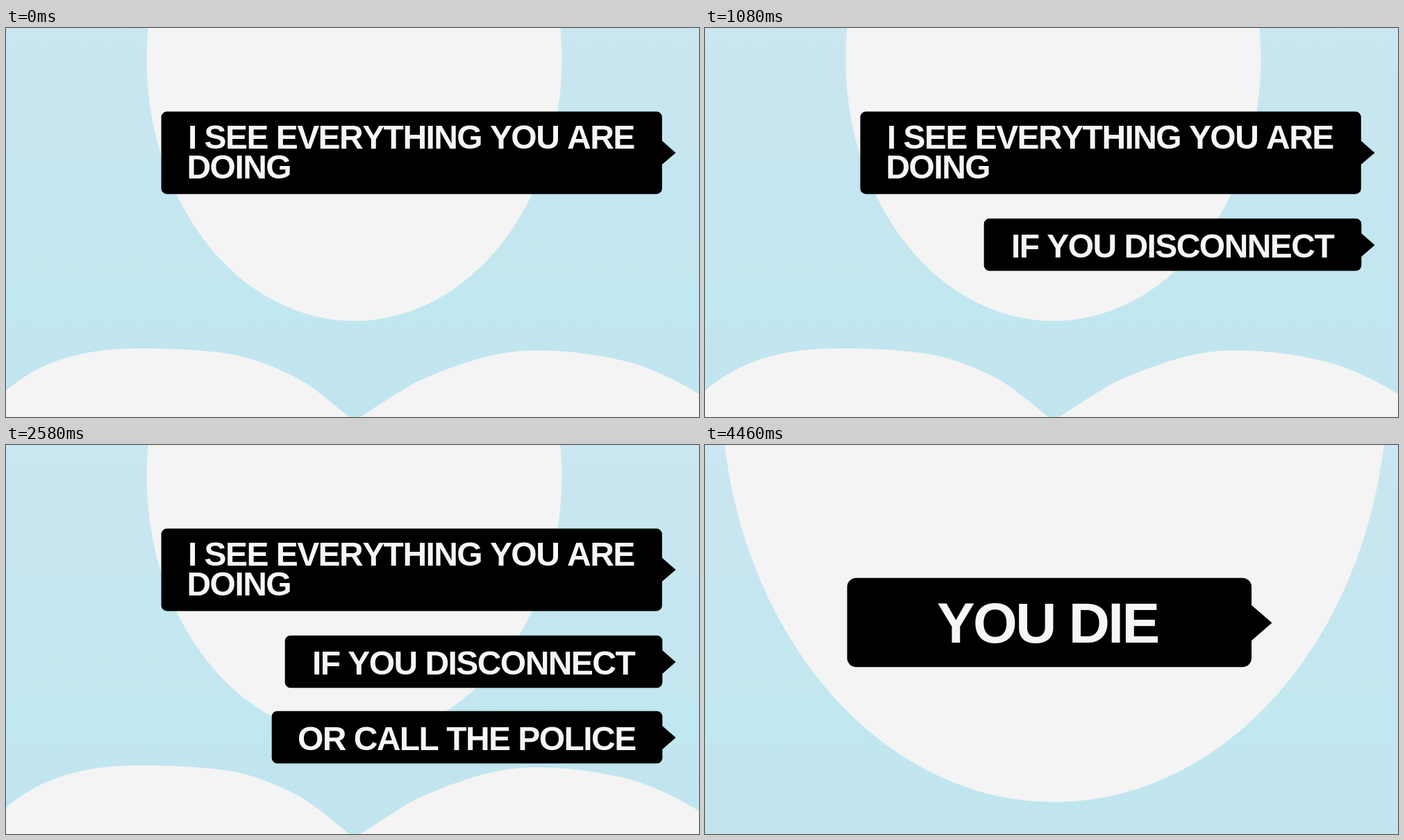
Animation, 998 px wide and 561 px high, one loop 5040 ms. Source, as an HTML page:

```html
<!DOCTYPE html>
<html lang="en">
<head>
<meta charset="utf-8">
<title>Speech bubbles</title>
<style>
  html, body { margin: 0; width: 100%; height: 100%; overflow: hidden; background: #c2e6f0; }
  svg { display: block; width: 100%; height: 100%; }
  .cloud { fill: #f4f4f4; }
  .bubble { fill: #000; color: #f6f6f6; }
  text {
    fill: currentColor;
    font: bold 48px "Liberation Sans", Arial, sans-serif;
    font-kerning: none;
    letter-spacing: -.0325em;
  }
  .big text { font-size: 82px; }

  .wide, .close, .second, .third, .fourth { animation: 5040ms step-end infinite; }
  .wide { animation-name: wide; }
  .close { animation-name: close; }
  .second { animation-name: second; transform-origin: 975px 313px; }
  .third { animation-name: third; transform-origin: 975px 421.5px; }
  .fourth { animation-name: fourth; transform-origin: 833px 253.5px; }

  @keyframes wide { 0% { visibility: visible } 74.4%, 100% { visibility: hidden } }
  @keyframes close { 0% { visibility: hidden } 74.4%, 100% { visibility: visible } }

  /* Each bubble grows past full size and settles; its words arrive at the peak. */
  @keyframes second {
    0% { transform: scale(0); color: transparent }
    18.25% { transform: scale(.242); color: transparent }
    19.04% { transform: scale(.637); color: transparent }
    19.84% { transform: scale(1.033); color: #f6f6f6 }
    20.63% { transform: scale(1.016); color: #f6f6f6 }
    21.42%, 100% { transform: none; color: #f6f6f6 }
  }
  @keyframes third {
    0% { transform: scale(0); color: transparent }
    40.47% { transform: scale(.242); color: transparent }
    41.26% { transform: scale(.637); color: transparent }
    42.06% { transform: scale(1.033); color: #f6f6f6 }
    42.85% { transform: scale(1.016); color: #f6f6f6 }
    43.65%, 100% { transform: none; color: #f6f6f6 }
  }
  @keyframes fourth {
    0% { transform: scale(0); color: transparent }
    74.4% { transform: scale(.637); color: transparent }
    75.19% { transform: scale(1.033); color: #f6f6f6 }
    75.99% { transform: scale(1.016); color: #f6f6f6 }
    76.98%, 100% { transform: none; color: #f6f6f6 }
  }
</style>
</head>
<body>
<svg viewBox="0 0 998 561" preserveAspectRatio="none">
  <defs>
    <linearGradient id="sky" x2="0" y2="1">
      <stop offset="0" stop-color="#cae6f0"/>
      <stop offset=".32" stop-color="#c7e6f0"/>
      <stop offset=".37" stop-color="#c4e6f0"/>
      <stop offset=".63" stop-color="#c3e6ef"/>
      <stop offset=".68" stop-color="#c1e8f0"/>
      <stop offset=".78" stop-color="#c1e6f0"/>
      <stop offset="1" stop-color="#c0e5ef"/>
    </linearGradient>
  </defs>
  <rect width="998" height="561" fill="url(#sky)"/>

  <g class="wide">
    <g class="cloud">
      <ellipse cx="501.5" cy="45" rx="299" ry="377.5"/>
      <path d="M0 523C50 480 110 462 195 462C240 462 290 465 322 470C362 477 397 493 425 508C445 520 470 541 494 561H0Z"/>
      <path d="M510 561C535 545 560 528 590 511C625 495 670 478 705 471C730 466 745 465 765 465C810 465 850 471 890 480C930 490 970 510 998 528V561Z"/>
    </g>
    <g class="bubble">
      <rect x="223.6" y="120.6" width="721.2" height="118.8" rx="8"/>
      <path d="M944 162L964.5 180L944 197.5Z"/>
      <text x="262" y="174">I SEE EVERYTHING YOU ARE</text>
      <text x="260.5" y="216.5">DOING</text>
    </g>
    <g class="bubble second">
      <rect x="401.7" y="274.7" width="543.6" height="75.6" rx="8"/>
      <path d="M944.5 295.5L964.5 313L944.5 330.5Z"/>
      <text x="441" y="330.5">IF YOU DISCONNECT</text>
    </g>
    <g class="bubble third">
      <rect x="382.7" y="383.7" width="562.6" height="75.6" rx="8"/>
      <path d="M944.5 404.5L964.5 422L944.5 439.5Z"/>
      <text x="420" y="439.5">OR CALL THE POLICE</text>
    </g>
  </g>

  <g class="close">
    <ellipse class="cloud" cx="503" cy="-90" rx="480" ry="605"/>
    <g class="bubble big fourth">
      <rect x="204.7" y="191.7" width="582.4" height="128.6" rx="13"/>
      <path d="M779 224L816.5 256.5L779 289Z"/>
      <text x="334" y="285">YOU DIE</text>
    </g>
  </g>
</svg>
</body>
</html>
```
